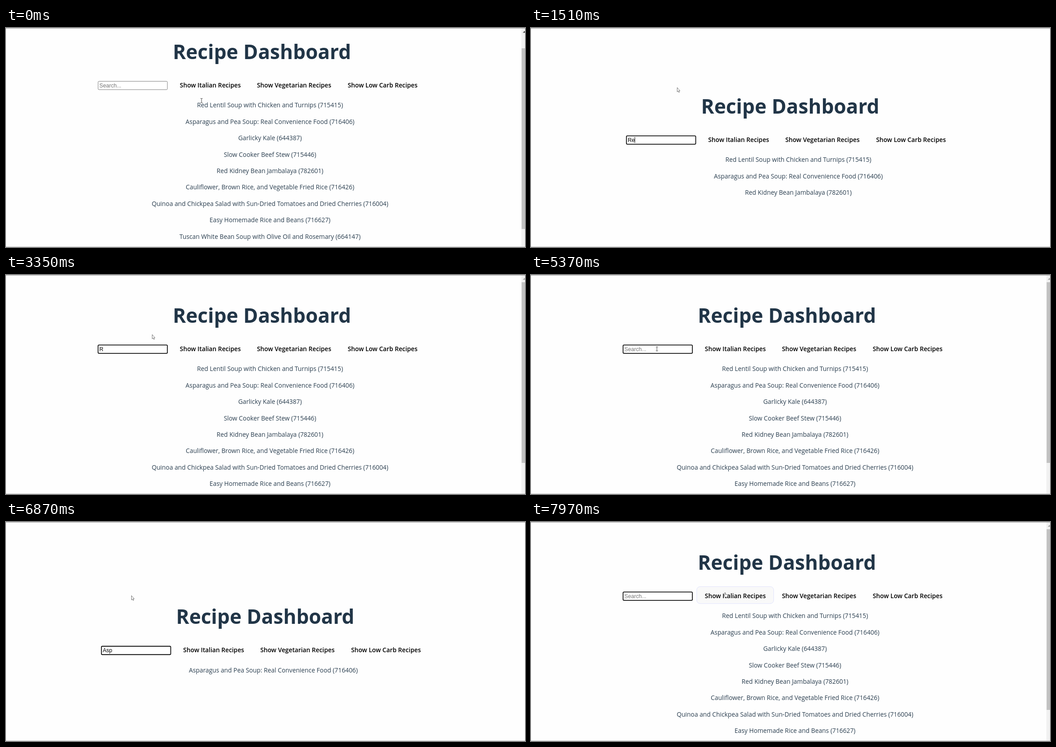
An HTML page that plays this animation: 1152 px wide and 486 px high, repeating every 8 s.

```html
<!DOCTYPE html>
<html lang="en">
<head>
<meta charset="utf-8">
<title>Recipe Dashboard</title>
<style>
  html, body { margin: 0; width: 100%; height: 100%; overflow: hidden; background: #fefefe; }
  svg { display: block; width: 1152px; height: 486px; }
  text { font: 13.8px "Open Sans", "Noto Sans", sans-serif; fill: #2b3f50; }
  .mid { text-anchor: middle; }
  .title { font-size: 44.1px; font-weight: 700; fill: #213547; }
  .button { font-size: 13.75px; font-weight: 600; fill: #000; }
  .field { font: 12.16px "Liberation Sans", Arial, sans-serif; fill: #000; }
  .placeholder { fill: #757575; }
</style>
</head>
<body>
<svg id="stage" viewBox="0 0 1152 486"></svg>
<script>
const DURATION = 8000;
const ROW_STEP = 36.43;
const stage = document.getElementById('stage');

const recipes = [
  'Red Lentil Soup with Chicken and Turnips (715415)',
  'Asparagus and Pea Soup: Real Convenience Food (716406)',
  'Garlicky Kale (644387)',
  'Slow Cooker Beef Stew (715446)',
  'Red Kidney Bean Jambalaya (782601)',
  'Cauliflower, Brown Rice, and Vegetable Fried Rice (716426)',
  'Quinoa and Chickpea Salad with Sun-Dried Tomatoes and Dried Cherries (716004)',
  'Easy Homemade Rice and Beans (716627)',
  'Tuscan White Bean Soup with Olive Oil and Rosemary (664147)'
];
const buttons = [
  ['Show Italian Recipes', 453.5],
  ['Show Vegetarian Recipes', 639.5],
  ['Show Low Carb Recipes', 836]
];

const pointers = {
  arrow: '<path d="M.5 .2V9.8L2.6 7.8 4.1 11 5.5 10.4 4.1 7.3H6.7Z" fill="#fff" stroke="#555" stroke-width=".8"/>',
  beam: '<path d="M-2.4-4.6H-.6L0-4.2.6-4.6H2.4M0-4.2V4.2M-2.4 4.6H-.6L0 4.2.6 4.6H2.4" fill="none" stroke="#333" stroke-width=".9"/>',
  hand: '<path d="M-1.6-5Q-.7-6 .2-5V-1.5L4.2-.7Q5.2-.3 5 1L4.3 4.8H-.6L-3.6 1.2Q-3.6 0-1.6 1Z" fill="#fff" stroke="#666" stroke-width=".9"/>'
};

const initial = { query: '', scroll: 37, border: '#767676', focus: false, caret: false, hover: 0, pointer: 'beam', x: 434, y: 161 };

// Each step changes part of the state and holds until the next.
const steps = [
  [160, { x: 344, y: 136 }],
  [310, { x: 324, y: 132, border: '#4f4f4f' }],
  [460, { focus: true, caret: true }],
  [1110, { caret: false }],
  [1380, { query: 'R', caret: true }],
  [1510, { query: 'Re', pointer: 'arrow', scroll: 0 }],
  [1770, { query: 'Red' }],
  [2220, { caret: false }],
  [2850, { caret: true }],
  [3100, { query: 'Re' }],
  [3350, { query: 'R', caret: false }],
  [3490, { query: '' }],
  [3800, { caret: true }],
  [4050, { x: 351, y: 151 }],
  [4190, { pointer: 'hand', x: 390, y: 161, hover: .2 }],
  [4317, { x: 430, y: 166, hover: .7, caret: false }],
  [4443, { x: 455, y: 174, hover: 1 }],
  [4570, { pointer: 'arrow', x: 462, y: 196, hover: 0 }],
  [4697, { x: 455, y: 226 }],
  [4823, { x: 434, y: 242, caret: true }],
  [4950, { x: 407, y: 239 }],
  [5080, { x: 317, y: 199 }],
  [5220, { x: 281.5, y: 168.5 }],
  [5370, { pointer: 'beam', x: 279.5, y: 164, caret: false }],
  [5900, { query: 'A', caret: true }],
  [6180, { query: 'As' }],
  [6310, { caret: false }],
  [6870, { query: 'Asp', pointer: 'arrow', x: 278, y: 163.2 }],
  [7120, { query: 'As' }],
  [7270, { query: 'A', pointer: 'beam', x: 279.5, y: 164 }],
  [7400, { query: '', caret: true }],
  [7810, { x: 293, y: 164, caret: false }],
  [7970, { pointer: 'hand', x: 431.5, y: 162, hover: .2 }]
];

const rect = (x, y, w, h, attrs) => `<rect x="${x}" y="${y}" width="${w}" height="${h}" ${attrs}/>`;
const text = (x, y, cls, content) => `<text x="${x}" y="${y}" class="${cls}">${content}</text>`;

function scrollbar(scroll, rowCount) {
  const top = scroll ? 45 : 16;
  const height = rowCount < recipes.length ? 459 : 401;
  return rect(1144, 1, 8, 484, 'fill="#f1f1f1"') +
    rect(1144.5, top, 7.5, height, 'fill="#c1c1c1"') +
    `<path d="M1147 10.5 1150.7 6.8 1154.4 10.5Z" fill="${scroll ? '#505050' : '#a3a3a3'}"/>`;
}

function draw(s) {
  const rows = recipes.filter(name => name.toLowerCase().includes(s.query.toLowerCase()));
  const overflow = rows.length > 7;
  const dx = overflow ? 0 : 7.4;
  const base = overflow ? 106 - s.scroll : 190 - (rows.length - 3) * ROW_STEP / 2;
  const line = base + 62.5;

  let page = text(568, base, 'mid title', 'Recipe Dashboard');
  if (s.hover) {
    page += rect(367.9, base + 37.4, 170.7, 37.6,
      `rx="7.3" fill="#f9f9f9" stroke="#646cff" stroke-opacity="${s.hover}" stroke-width=".9"`);
  }
  page += rect(204.4, base + 49.3, 153.8, 18.5,
    `rx="2" fill="#fff" stroke="${s.focus ? '#101010' : s.border}" stroke-width="${s.focus ? 1.8 : .95}"`);
  page += text(207.3, line, s.query ? 'field' : 'field placeholder', s.query || 'Search...');
  page += buttons.map(([label, x]) => text(x, line, 'mid button', label)).join('');
  page += rows.map((name, i) => text(586, base + 107.3 + i * ROW_STEP, 'mid', name)).join('');

  stage.innerHTML = `<g id="page" transform="translate(${dx} 0)">${page}</g>` +
    (overflow ? scrollbar(s.scroll, rows.length) : '') +
    rect(0, 0, 1152, 1, 'fill="#989898"') + rect(0, 485, 1152, 1, 'fill="#c4c4c4"') +
    `<g transform="translate(${s.x} ${s.y})">${pointers[s.pointer]}</g>`;

  if (s.caret) {
    const typed = s.query ? stage.querySelector('.field').getComputedTextLength() : 0;
    document.getElementById('page').insertAdjacentHTML('beforeend',
      rect(207.1 + typed, line - 10.5, 1, 13, 'fill="#000"'));
  }
}

let shown = -1;
function tick() {
  const time = performance.now() % DURATION;
  const count = steps.filter(([start]) => start <= time).length;
  if (count !== shown) {
    shown = count;
    draw(Object.assign({}, initial, ...steps.slice(0, count).map(([, change]) => change)));
  }
  requestAnimationFrame(tick);
}
tick();
</script>
</body>
</html>
```
